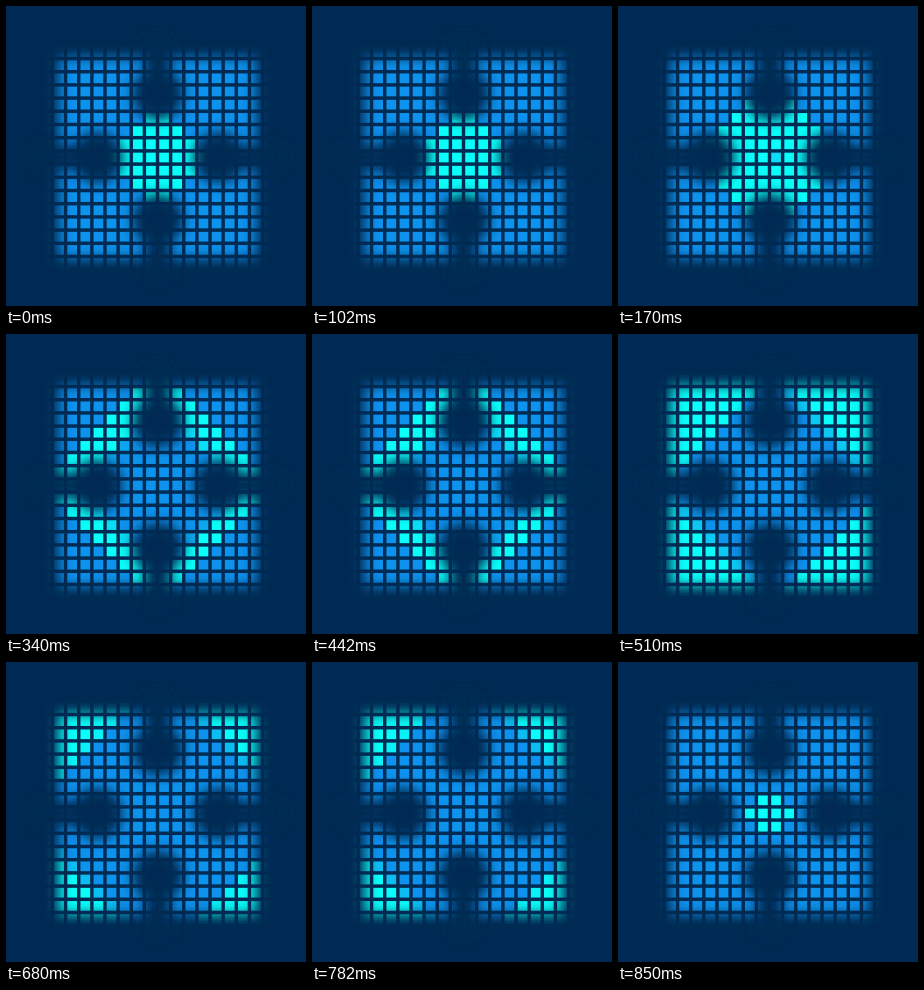
Recreate the animation shown at these times as an HTML page. Size 300 px wide and 300 px high, loop 1020 ms.

```html
<!DOCTYPE html>
<html lang="en">
<head>
<meta charset="utf-8">
<title>Pulse grid</title>
<style>
html, body { margin: 0; width: 100%; height: 100%; overflow: hidden; background: #002b53; }
svg { display: block; width: 100vw; height: 100vh; }
</style>
</head>
<body>
<svg viewBox="0 0 300 300">
  <defs>
    <filter id="soft" filterUnits="userSpaceOnUse" x="-40" y="-40" width="380" height="380">
      <feGaussianBlur stdDeviation="6.500"/>
    </filter>
  </defs>
  <rect width="300" height="300" fill="#002b53"/>
  <g id="cells"></g>
  <g fill="#002b53">
    <path filter="url(#soft)" fill-rule="evenodd" d="M-40-40H340V340H-40ZM53 52V252H250V52Z"/>
    <g filter="url(#soft)">
      <circle cx="152" cy="88" r="26"/>
      <circle cx="152" cy="214" r="26"/>
      <circle cx="91" cy="151.500" r="26"/>
      <circle cx="213" cy="151.500" r="26"/>
      <path d="M139 30H164V80H139ZM139 224H164V274H139ZM26 139H80V164H26ZM224 139H278V164H224Z"/>
    </g>
  </g>
</svg>
<script>
const NS = "http://www.w3.org/2000/svg";
const PITCH_X = 13.13, PITCH_Y = 13.2, SIZE = 9.7, CENTER = 151.5;
const STEP = 170;
const BLUE = [13, 146, 237], CYAN = [10, 253, 248];
const TAIL_SHIFT = 0.25;

// Diamond bands lit at each step: [start of the soft tail, front], in cells
const bands = [[-1, 3.5], [-0.2, 5.5], [5.8, 8.5], [8, 99], [10.1, 99], [-1, 1.5]];

const root = document.getElementById("cells");
const cells = [];
for (let row = -8; row <= 8; row++) {
  for (let col = -8.5; col <= 8.5; col++) {
    const el = document.createElementNS(NS, "rect");
    el.setAttribute("x", CENTER + col * PITCH_X - SIZE / 2);
    el.setAttribute("y", CENTER + row * PITCH_Y - SIZE / 2);
    el.setAttribute("width", SIZE);
    el.setAttribute("height", SIZE);
    root.appendChild(el);
    cells.push({
      el,
      front: Math.abs(row) + Math.abs(col),
      tail: Math.abs(row - TAIL_SHIFT) + Math.abs(col - TAIL_SHIFT)
    });
  }
}

const mix = k => `rgb(${BLUE.map((b, i) => Math.round(b + (CYAN[i] - b) * k))})`;

let shown = -1;
function draw(time) {
  const step = Math.floor(time / STEP) % bands.length;
  if (step === shown) return;
  shown = step;
  const [inner, outer] = bands[step];
  for (const { el, front, tail } of cells) {
    const glow = front > outer ? 0 : Math.min(1, Math.max(0, tail - inner));
    el.setAttribute("fill", mix(glow));
  }
}

const start = performance.now();
function tick() {
  draw(performance.now() - start);
  requestAnimationFrame(tick);
}
tick();
</script>
</body>
</html>
```
